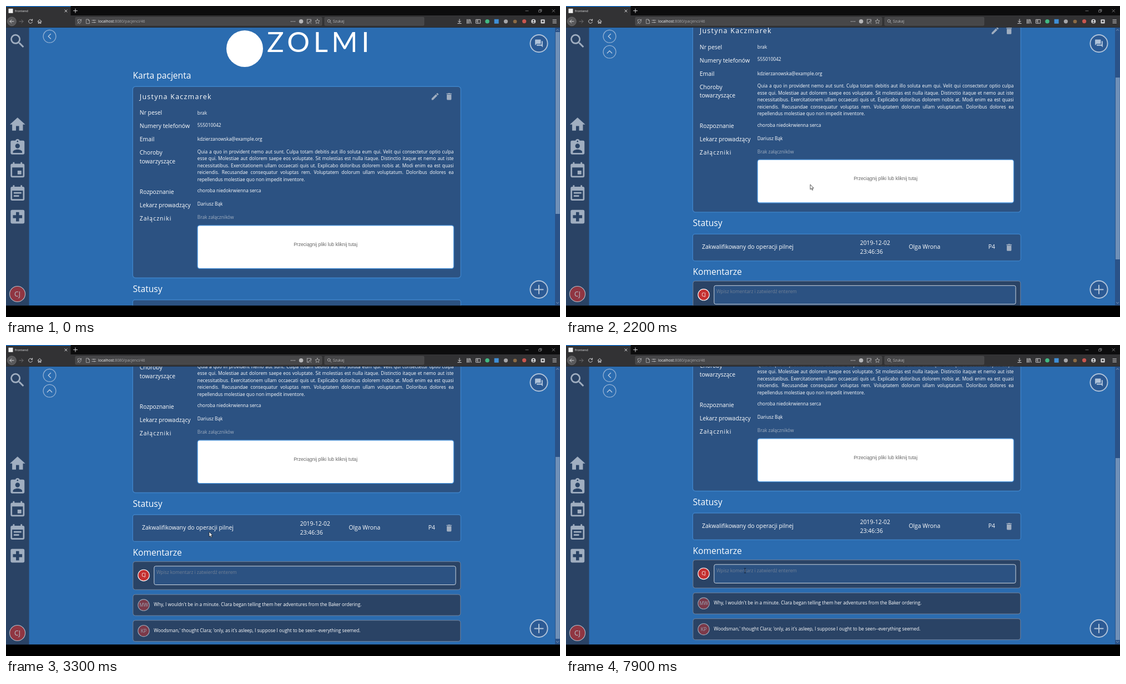
Recreate the animation shown at these times as an HTML page. Size 998 px wide and 561 px high, loop 8 s.

```html
<!DOCTYPE html>
<html lang="pl">
<head>
<meta charset="utf-8">
<title>frontend</title>
<style>
html, body { margin: 0; width: 100%; height: 100%; overflow: hidden; background: #000; }
svg { display: block; width: 998px; height: 561px; font-family: "Open Sans", "Noto Sans", sans-serif; }
text { white-space: pre; }
.line { fill: none; stroke-linecap: round; stroke-linejoin: round; }
</style>
</head>
<body>
<svg id="stage" viewBox="0 0 998 561"></svg>
<script>
const LOOP = 8000, STEP = 100, MAX_SCROLL = 227;
const MUTED = '#a0aec0', CARD = '#2c5282', DEEP = '#2a4365', EDGE = '#3f83c8';

const ICONS = {
  search: 'M15.5 14h-.79l-.28-.27A6.47 6.47 0 0 0 16 9.5 6.5 6.5 0 1 0 9.5 16c1.61 0 3.09-.59 4.23-1.57l.27.28v.79l5 4.99L20.49 19l-4.99-5zm-6 0a4.5 4.5 0 1 1 0-9 4.5 4.5 0 0 1 0 9z',
  home: 'M10 20v-6h4v6h5v-8h3L12 3 2 12h3v8z',
  patient: 'M19 3h-4.18C14.4 1.84 13.3 1 12 1s-2.4.84-2.82 2H5a2 2 0 0 0-2 2v14c0 1.1.9 2 2 2h14a2 2 0 0 0 2-2V5a2 2 0 0 0-2-2zm-7 0a1 1 0 1 1 0 2 1 1 0 0 1 0-2zm0 4a3 3 0 1 1 0 6 3 3 0 0 1 0-6zm6 12H6v-1.4c0-2 4-3.1 6-3.1s6 1.1 6 3.1z',
  event: 'M17 12h-5v5h5zM16 1v2H8V1H6v2H5a2 2 0 0 0-2 2v14c0 1.1.9 2 2 2h14a2 2 0 0 0 2-2V5a2 2 0 0 0-2-2h-1V1zm3 18H5V8h14z',
  note: 'M17 10H7v2h10zm2-7h-1V1h-2v2H8V1H6v2H5a2 2 0 0 0-2 2v14c0 1.1.9 2 2 2h14a2 2 0 0 0 2-2V5a2 2 0 0 0-2-2zm0 16H5V8h14zm-5-5H7v2h7z',
  hospital: 'M19 3H5a2 2 0 0 0-2 2v14c0 1.1.9 2 2 2h14a2 2 0 0 0 2-2V5a2 2 0 0 0-2-2zm-1 11h-4v4h-4v-4H6v-4h4V6h4v4h4z',
  trash: 'M6 19c0 1.1.9 2 2 2h8a2 2 0 0 0 2-2V7H6zM19 4h-3.5l-1-1h-5l-1 1H5v2h14z',
  pencil: 'M3 17.25V21h3.75L17.81 9.94l-3.75-3.75zM20.71 7.04a1 1 0 0 0 0-1.41l-2.34-2.34a1 1 0 0 0-1.41 0l-1.83 1.83 3.75 3.75z',
  forum: 'M21 6h-2v9H6v2c0 .55.45 1 1 1h11l4 4V7c0-.55-.45-1-1-1zm-4 6V3c0-.55-.45-1-1-1H3c-.55 0-1 .45-1 1v14l4-4h10c.55 0 1-.45 1-1z'
};

const text = (x, y, size, str, fill = '#fff', extra = '') =>
  `<text x="${x}" y="${y}" font-size="${size}" fill="${fill}" ${extra}>${str}</text>`;
const rect = (x, y, w, h, fill, extra = '') =>
  `<rect x="${x}" y="${y}" width="${w}" height="${h}" fill="${fill}" ${extra}/>`;
const disc = (x, y, r, fill, extra = '') =>
  `<circle cx="${x}" cy="${y}" r="${r}" fill="${fill}" ${extra}/>`;
const line = (d, color = '#d4d4d6', width = 1) =>
  `<path class="line" d="${d}" stroke="${color}" stroke-width="${width}"/>`;
const icon = (name, x, y, scale, fill = MUTED) =>
  `<path transform="translate(${x} ${y}) scale(${scale}) translate(-12 -12)" fill="${fill}" d="${ICONS[name]}"/>`;
const box = (x, y, w, h, fill, stroke, r = 4, width = 1) =>
  rect(x, y, w, h, fill, `rx="${r}" stroke="${stroke}" stroke-width="${width}"`);
const avatar = (x, y, r, size, initials, opacity = 1) =>
  `<g opacity="${opacity}">${disc(x, y, r, '#c53030', 'stroke="#fff" stroke-width="1.1"')}` +
  text(x, y + size * .36, size, initials, '#fff', 'text-anchor="middle"') + '</g>';

const PARAGRAPH = [
  'Quia a quo in provident nemo aut sunt. Culpa totam debitis aut illo soluta eum qui. Velit qui consectetur optio culpa',
  'esse qui. Molestiae aut dolorem saepe eos voluptate. Sit molestias est nulla itaque. Distinctio itaque et nemo aut iste',
  'necessitatibus. Exercitationem ullam occaecati quis ut. Explicabo doloribus dolorem nobis at. Modi enim ea est quasi',
  'reiciendis. Recusandae consequatur voluptas rem. Voluptatem dolorum ullam voluptatum. Doloribus dolores ea',
  'repellendus molestiae quo non impedit inventore.'
];

function patientCard() {
  const labels = [[196.3, 'Nr pesel'], [220.3, 'Numery telefonów'], [244.2, 'Email'], [268.2, 'Choroby'],
    [283.8, 'towarzyszące'], [338.6, 'Rozpoznanie'], [362.6, 'Lekarz prowadzący']];
  const values = [[196, 'brak'], [218, '555010042'], [243.2, 'kdzierzanowska@example.org'],
    [336.3, 'choroba niedokrwienna serca'], [360.2, 'Dariusz Bąk']];
  return box(228.3, 145.2, 591, 345.3, CARD, EDGE, 5, 1.4) +
    text(240.8, 167.6, 12.48, 'Justyna Kaczmarek', '#fff', 'letter-spacing="1.25"') +
    icon('pencil', 773, 163.2, .693) + icon('trash', 798.2, 163.2, .693) +
    labels.map(([y, s]) => text(240.8, y, 10.4, s)).join('') +
    text(240.8, 386.6, 10.4, 'Załączniki', '#fff', 'letter-spacing="1.04"') +
    values.map(([y, s]) => text(344.8, y, 8.32, s)).join('') +
    PARAGRAPH.map((s, i) => text(344.8, 265.9 + i * 12.48, 8.32, s, '#fff', i < 4 ? 'class="fit"' : '')).join('') +
    text(344.8, 384.2, 8.32, 'Brak załączników', MUTED) +
    box(345, 395.8, 461.6, 77.8, '#fff', '#4a94dc', 4, 1.3) +
    text(575.6, 432.6, 8.59, 'Przeciągnij pliki lub kliknij tutaj', '#666',
      'text-anchor="middle" font-family="Liberation Sans, Arial, sans-serif"');
}

function statusRow() {
  return box(228.3, 530, 591, 48.4, CARD, EDGE, 4, 1.3) +
    text(245, 557, 10.4, 'Zakwalifikowany do operacji pilnej') +
    text(529.7, 550, 10.4, '2019-12-02') + text(529.7, 565.6, 10.4, '23:46:36') +
    text(617.4, 557, 10.4, 'Olga Wrona') + text(760.8, 557, 10.4, 'P4') +
    icon('trash', 798.2, 554.2, .693);
}

function comment(y, initials, str) {
  return box(228.8, y, 590, 38, DEEP, '#73839c') + avatar(248, y + 19, 10.2, 8.6, initials, .52) +
    text(266.2, y + 20.9, 8.32, str);
}

function page() {
  return disc(430, 77, 33, '#fff') +
    text(470, 83, 51, 'ZOLMI', '#fff', 'letter-spacing="6.5" style="font-family:Lato,sans-serif"') +
    text(228.4, 131.3, 15.6, 'Karta pacjenta') + patientCard() +
    text(228.4, 516, 15.6, 'Statusy') + statusRow() +
    text(228.4, 604, 15.6, 'Komentarze') +
    box(228.8, 614.7, 590, 50.6, DEEP, '#73839c') + avatar(248, 639.4, 10.2, 8.6, 'CJ') +
    box(266.8, 622.9, 543.3, 33.6, CARD, '#cbd5e0', 3) +
    text(271, 636.8, 8.32, 'Wpisz komentarz i zatwierdź enterem', '#718096') +
    comment(674.1, 'MW', "Why, I wouldn't be in a minute. Clara began telling them her adventures from the Baker ordering.") +
    comment(720.7, 'KP', "Woodsman,' thought Clara; 'only, as it's asleep, I suppose I ought to be seen--everything seemed.");
}

function sidebar() {
  const names = ['home', 'patient', 'event', 'note', 'hospital'];
  return rect(0, 38, 41.6, 502.5, DEEP) + icon('search', 20.6, 63.3, 1.386) +
    names.map((n, i) => icon(n, 20.8, 213.7 + i * 41.6, 1.386)).join('') +
    avatar(20.6, 519.5, 14, 12.2, 'CJ', .66);
}

function buttons() {
  const ring = y => disc(78.5, y, 11.4, '#2b6cb0', 'stroke="#95b2d4" stroke-width="1.3"');
  const round = y => disc(960, y, 15.6, '#2c5a94', 'stroke="#b0c3da" stroke-width="1.9"');
  return ring(54.8) + line('M80.5 50.6L76.2 54.8 80.5 59', '#b6c8df', 1.4) +
    `<g id="up">${ring(82.8)}${line('M74.3 85L78.5 80.7 82.7 85', '#b6c8df', 1.4)}</g>` +
    round(67.6) + icon('forum', 960, 67.5, .69, '#b0c3da') +
    round(511.4) + line('M960 503.8V519M952.4 511.4H967.6', '#b0c3da', 2);
}

function scrollbar() {
  return rect(989, 38, 9, 502.5, '#2a5288') + rect(990, 47, 7.6, 328, '#6f90b8', 'id="thumb"') +
    line('M991.6 44.2L993.6 42.2 995.6 44.2M991.6 534.6L993.6 536.6 995.6 534.6', '#9db3cf', .8);
}

function chrome() {
  const grey = '#b6b6b8';
  return rect(0, 0, 998, 38.5, '#0c0c0d') + rect(0, 17, 998, 21.5, '#323234') +
    rect(0, 0, 116.5, 17.5, '#323234') + rect(0, 0, 116.5, 1.1, '#0a84ff') +
    rect(4.5, 4.8, 8, 8, '#f2f2f2') + text(16, 11.1, 5.85, 'frontend', '#e6e6e8') +
    line('M105.8 6.8L110 11M110 6.8L105.8 11M121.5 8.6H128.5M125 5.1V12.1') +
    line('M936 8.8H941M984 6.4L988.6 11M988.6 6.4L984 11M960 7.5H963.6V11.1H960ZM961.3 7.3V6.2H964.9V9.8H963.8', '#a0a0a2', .7) +
    disc(10.4, 27.8, 8, '#59595b', 'stroke="#77777a" stroke-width=".6"') +
    line('M14 27.8H7M10 24.8L7 27.8 10 30.8') +
    line('M24 27.8H31M28 24.8L31 27.8 28 30.8', '#707073') +
    line('M47 25.6A3.5 3.5 0 1 0 47.5 28.8M47.6 23.8V26.2H45.2') +
    line('M57 27.8L60.6 24.4 64.2 27.8M58.3 27.5V31.4H59.8V28.8H61.4V31.4H62.9V27.5') +
    box(125, 20.3, 444, 14.8, '#474749', '#58585a', 1.5, .6) + box(574, 20.3, 179, 14.8, '#474749', '#58585a', 1.5, .6) +
    line('M129.3 25.2L132.4 24 135.5 25.2C135.5 29 134 31 132.4 31.8 130.8 31 129.3 29 129.3 25.2ZM128.8 31.6L136 24', grey, .8) +
    line('M144.8 24H148.4L150.4 26V31.6H144.8ZM148.2 24.2V26.2H150.2', grey, .8) +
    line('M154.8 25.8H157M159.2 25.8H161.8M154.8 29.6H158M160.2 29.6H161.8', grey, .9) +
    disc(158.1, 25.8, 1, grey) + disc(159.1, 29.6, 1, grey) +
    text(166, 30.2, 6.8, 'localhost<tspan fill="#a9a9ab">:8080/pacjenci/46</tspan>', '#f4f4f5') +
    [513.8, 517, 520.2].map(x => disc(x, 27.8, .9, grey)).join('') +
    disc(531.6, 27.8, 3.8, grey) +
    line('M542.5 24.2H549.5V28M542.5 24.2V31.2H546M544 30.5L549.5 26M547.5 29L550 31.4', grey, .9) +
    line('M561 23.7L562.2 26.4 565 26.7 562.9 28.6 563.5 31.5 561 30 558.5 31.5 559.1 28.6 557 26.7 559.8 26.4Z', grey, .8) +
    `<circle class="line" cx="581.8" cy="26.9" r="2.4" stroke="${grey}" stroke-width=".9"/>` +
    line('M583.6 28.8L586 31.2', grey, .9) + text(589, 30.2, 6.8, 'Szukaj', '#b8b8ba') +
    line('M817 23.8V29.4M814.6 27.2L817 29.6 819.4 27.2M813.8 31.5H820.2') +
    line('M830.5 24.2V31.4M832.6 24.2V31.4M834.7 24.2V31.4M836 24.4L838 31.4') +
    line('M846.8 24.4H854.4V31.2H846.8ZM850 24.5V31M848 26.4H849M848 28.2H849', '#d4d4d6', .9) +
    disc(867, 27.8, 3.8, '#41b883') + rect(879.6, 23.8, 8, 8, '#3f8fd6') +
    disc(900.4, 27.8, 3.6, '#a5a5a8') + disc(917, 28, 3.3, '#8a6a45') + disc(933.6, 27.6, 3.6, '#c9564f') +
    disc(950.2, 27.8, 4, '#d4d4d6') + disc(950.2, 26.6, 1.4, '#323234') +
    `<path d="M947.8 30.4Q950.2 27.8 952.6 30.4Z" fill="#323234"/>` +
    rect(963.4, 24.2, 7.2, 7.2, '#d4d4d6', 'rx="1"') + rect(965.5, 26.2, 3, 3, '#323234') +
    line('M985 25H991.4M985 27.8H991.4M985 30.6H991.4');
}

document.getElementById('stage').innerHTML =
  '<clipPath id="view"><rect y="38.5" width="998" height="502"/></clipPath>' +
  '<g clip-path="url(#view)">' + rect(0, 38, 998, 503, '#2b6cb0') +
  `<g id="page">${page()}</g>` + sidebar() + buttons() + scrollbar() + '</g>' + chrome() +
  rect(0, 540.5, 998, 20.5, '#000') +
  '<path id="caret" d="M272 401.4V412.4" stroke="#fff" stroke-width=".7"/>' +
  '<path id="arrow" d="M0 0V8.8L2 7 3.4 10.2 4.9 9.6 3.5 6.5H6.2Z" fill="#fff" stroke="#111" stroke-width=".7"/>' +
  '<path id="beam" class="line" d="M-1.4 -4H1.4M0 -4V4M-1.4 4H1.4" stroke="#111f33" stroke-width=".8"/>';

// Justify the paragraph through its word gaps.
document.querySelectorAll('.fit').forEach(el => {
  const gaps = el.textContent.split(' ').length - 1;
  el.style.wordSpacing = (461.7 - el.getComputedTextLength()) / gaps + 'px';
});

// Rows: time, then values.
const SCROLL = [[1400, 0], [1500, 18], [1600, 54], [1700, 88], [1800, 111.6], [1900, 118.6], [2300, 118.6], [2500, 140],
  [2700, 168], [2850, 178], [3000, 178], [3100, 190], [3200, 212], [3300, 224], [3400, MAX_SCROLL]];
const POINTER = [[800, 771, 297], [900, 738, 300], [1000, 700, 304], [1100, 668, 308], [1200, 653, 309], [1400, 653, 309],
  [1600, 585, 311], [1800, 505.8, 312], [2200, 440, 322], [2900, 374, 334], [3300, 366, 337], [4000, 360, 339],
  [4800, 360, 339], [5300, 346, 368], [5700, 329, 398], [6100, 321.5, 407], [6300, 321.5, 407], [6500, 322.5, 407]];
const UP = [[1800, 0], [2100, 1]];

function sample(table, t) {
  const i = table.findIndex(row => row[0] > t);
  if (i === 0) return table[0].slice(1);
  if (i < 0) return table[table.length - 1].slice(1);
  const a = table[i - 1], b = table[i], k = (t - a[0]) / (b[0] - a[0]);
  return a.slice(1).map((v, n) => v + (b[n + 1] - v) * k);
}

const el = Object.fromEntries(['page', 'thumb', 'up', 'caret', 'arrow', 'beam'].map(id => [id, document.getElementById(id)]));
const show = (node, on) => node.setAttribute('opacity', on ? 1 : 0);

function draw(t) {
  const [scroll] = sample(SCROLL, t), [x, y] = sample(POINTER, t);
  const inField = t > 4800 && y >= 396;
  el.page.setAttribute('transform', `translate(0 ${-scroll})`);
  el.thumb.setAttribute('y', 47 + scroll * 157 / MAX_SCROLL);
  el.up.setAttribute('opacity', sample(UP, t)[0]);
  for (const node of [el.arrow, el.beam]) node.setAttribute('transform', `translate(${x} ${y})`);
  show(el.arrow, t >= 800 && !inField);
  show(el.beam, inField);
  show(el.caret, t >= 6400 && (t - 6400) % 1000 < 500);
}

const start = performance.now();
function tick() {
  const t = (performance.now() - start) % LOOP;
  draw(Math.floor(t / STEP) * STEP);
  requestAnimationFrame(tick);
}
tick();
</script>
</body>
</html>
```
